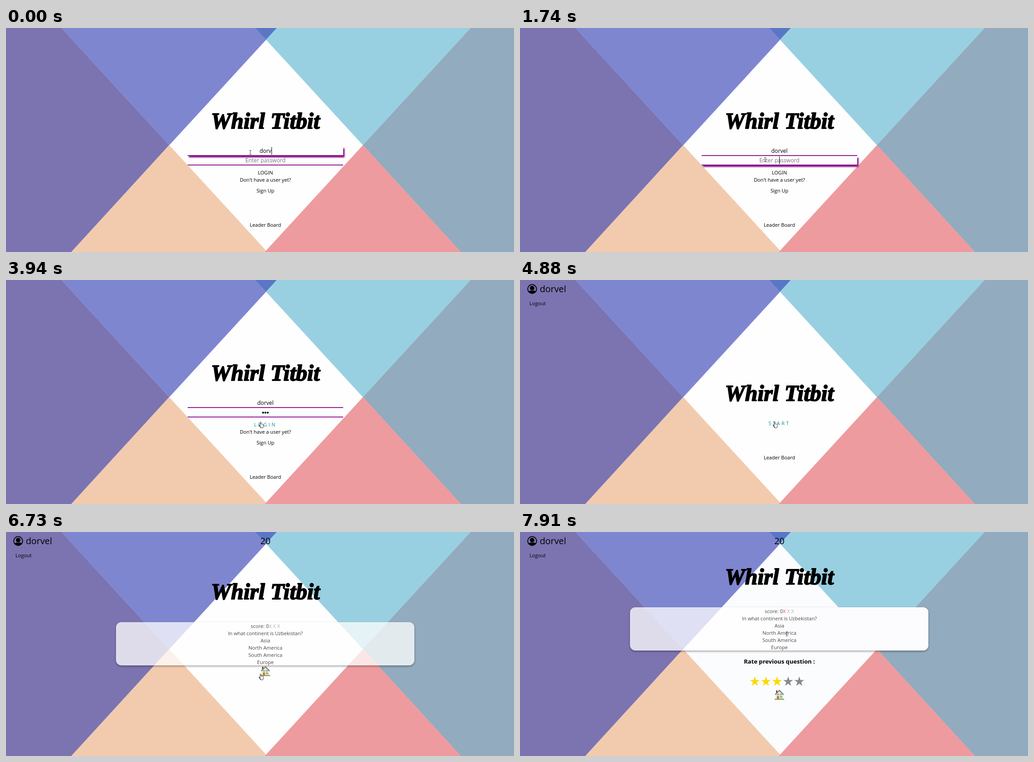
Animation, 1127 px wide and 497 px high, one loop 8000 ms. Source, as an HTML page:

```html
<!DOCTYPE html>
<html lang="en">
<head>
<meta charset="utf-8">
<title>Quiz</title>
<style>
  html, body { margin: 0; width: 100%; height: 100%; overflow: hidden; background: #fff; }
  #stage { position: relative; width: 1127px; height: 497px; overflow: hidden; }
  svg, .field, #bar { position: absolute; left: 0; top: 0; box-sizing: border-box; }
  .field { left: 403px; width: 345px; height: 20px; border-bottom: 2px solid #901a92; }
  #bar {
    left: 244px; width: 662px; overflow: hidden; opacity: .75;
    background: #fff; box-shadow: 0 2px 4px rgba(0, 0, 0, .5);
  }
  text { font: 11.1px "Open Sans", "Noto Sans", sans-serif; text-anchor: middle; white-space: pre; }
  .input { font-size: 12.3px; }
  .big { font-size: 19.8px; }
  .left { text-anchor: start; }
  .hint { fill: #757575; }
  .soft { fill: #000; fill-opacity: .72; }
  .rate { font-size: 13.1px; font-weight: 700; }
  .title {
    font: italic 700 50px "Liberation Serif", "Noto Serif", serif;
    stroke: #000; stroke-width: 2px; stroke-linejoin: round;
  }
</style>
</head>
<body>
<div id="stage">
  <svg id="back" width="1127" height="497"></svg>
  <div class="field" id="user" style="top:264px"></div>
  <div class="field" id="pass" style="top:284.5px"></div>
  <div id="bar"></div>
  <svg id="top" width="1127" height="497"></svg>
</div>
<script>
const LOOP = 8000, MID = 575.5, USER = 'dorvel', TITLE = 'Whirl Titbit';
const MENU = 4090, GAME = 6430, NEXT = 7760;
const CLICK_PASS = 1460, CLICK_LOGIN = 3530;

// Moments at which the screen refreshes
const TICKS = [
  0, 150, 460, 1030, 1170, 1320, 1460, 1600, 1740, 1890, 2040, 2190, 2380, 2570,
  3130, 3250, 3390, 3530, 3670, 3810, 3940, 4090, 4210, 4340, 4480, 4610, 4750, 4880,
  6430, 6580, 6730, 6870, 7010, 7150, 7310, 7460, 7610, 7760, 7910
];

// Pointer path: time, x, y
const PATH = [
  [1030, 542, 276], [1460, 543, 290], [1740, 544, 292], [3130, 544, 292],
  [3530, 564, 318], [3670, 566, 321], [6730, 566, 321], [7150, 594, 230], [7460, 592, 226]
];

const $ = id => document.getElementById(id);
const clamp = v => Math.max(0, Math.min(1, v));
const mix = (a, b, k) => a + (b - a) * k;
const smooth = k => k * k * (3 - 2 * k);
const ramp = (t, from, span) => smooth(clamp((t - from) / span));

const text = (str, y, cls = '', x = MID, extra = '') =>
  `<text x="${x}" y="${y}" class="${cls}" ${extra}>${str}</text>`;
const shape = (d, fill, extra = '') => `<path d="${d}" fill="${fill}" ${extra}/>`;
const at = (x, y, body) => `<g transform="translate(${x} ${y})">${body}</g>`;
const title = y => text(TITLE, y + 18, 'title');

function drawBack(paper) {
  const polys = [
    [paper, '577,26 792,260 577,494 362,260'],
    ['#7b74b1', '0,0 123,0 362,260 145,497 0,497'],
    ['#7f86d0', '123,0 553,0 577,26 362,260'],
    ['#5977c6', '553,0 601,0 577,26'],
    ['#99d0e1', '601,0 1031,0 792,260 577,26'],
    ['#92abbe', '1031,0 1127,0 1127,497 1009,497 792,260'],
    ['#ed9b9e', '792,260 1009,497 580,497 577,494'],
    ['#f2cbae', '362,260 577,494 574,497 145,497'],
    ['#e7a090', '577,494 580,497 574,497']
  ];
  $('back').innerHTML = polys.map(([fill, pts]) =>
    `<polygon points="${pts}" fill="${fill}" stroke="${fill}" stroke-width=".4"/>`).join('');
}

const avatar = at(27, 20,
  '<circle r="9.8" fill="none" stroke="#000" stroke-width="1.8"/><circle cy="-2" r="5" />' +
  shape('M-8 6Q-6 3.5-2.5 3Q0 5 2.5 3Q6 3.5 8 6Q5 10 0 10Q-5 10-8 6Z', '#000'));

const house = y => at(575.5, y,
  shape('M-7.5-9.5h3v7h-3z', '#b8243c') +
  shape('M-8 9.5V-1L1-9L8-1V9.5Z', '#fbe3b4') +
  shape('M-9.5 0L0-9.5L9.5 0', 'none', 'stroke="#6f8790" stroke-width="2.4"') +
  shape('M-5 3h3.5v6.5h-3.5z', '#c9513c') +
  shape('M1 3h5v4h-5zM-5-2h3.5v3h-3.5zM1-2h5v3h-5z', '#4fa9d3') +
  shape('M3-2h1v9h-1z', '#fbe3b4') +
  shape('M-10.5 9h21v2h-21z', '#6a9c3c'));

const POINTERS = {
  beam: shape('M-2.5-4.5h2l.5.5l.5-.5h2M0-4V4M-2.5 4.5h2l.5-.5l.5.5h2', 'none', 'stroke="#444" stroke-width="1"'),
  arrow: shape('M-1-6V4.5L1.5 2.3L3.2 6L4.8 5.3L3.1 1.7H6.3Z', '#fff', 'stroke="#222" stroke-width=".9"'),
  hand: shape('M-2.2 2V-5.5Q-1.2-7.2-.2-5.5V-1.5Q1-2.5 1.8-1.2Q3-2 3.6-.6Q5-1 5 .8V3.5Q4.5 5 3.8 7H-1.2Q-2-.0-5 1.8Q-4.6.2-2.2 2Q-4 .2-5 1.4L-1.2 7',
    '#fff', 'stroke="#222" stroke-width=".9" stroke-linejoin="round"')
};

function pointer(t) {
  let i = PATH.findIndex(p => p[0] > t);
  if (i < 0) i = PATH.length;
  const a = PATH[Math.max(0, i - 1)], b = PATH[Math.min(i, PATH.length - 1)];
  const k = b[0] > a[0] ? clamp((t - a[0]) / (b[0] - a[0])) : 0;
  const kind = t < 3390 ? 'beam' : t < GAME ? 'hand' : t < 6730 ? 'arrow'
    : t < 6870 ? 'hand' : t < 7010 ? 'arrow' : 'beam';
  return at(mix(a[1], b[1], k), mix(a[2], b[2], k), POINTERS[kind]);
}

// Link whose letters spread and turn teal under the pointer
function hoverLink(label, y, k) {
  const c = [[0, 22], [0, 138], [0, 155]].map(([a, b]) => Math.round(mix(a, b, k)));
  return text(label, y, '', MID, `style="letter-spacing:${(3.4 * k).toFixed(2)}px;fill:rgb(${c})"`);
}

const glow = k => `3px 3px 3px rgba(128, 0, 128, ${k})`;

function login(t) {
  const name = USER.slice(0, t < 150 ? 4 : t < 460 ? 5 : 6);
  const dots = t < 2190 ? 0 : t < 2380 ? 1 : t < 2570 ? 2 : 3;
  $('user').style.boxShadow = glow(1 - ramp(t, CLICK_PASS, 300));
  $('pass').style.boxShadow = glow(ramp(t, CLICK_PASS, 300) * (1 - ramp(t, CLICK_LOGIN, 300)));
  let out = title(205) + text(name, 277, 'input', MID, 'id="name"');
  if (!dots) out += text('Enter password', 298, 'input hint');
  for (let i = 0; i < dots; i++)
    out += `<circle cx="${MID + (i - (dots - 1) / 2) * 5.2}" cy="294.3" r="2.1"/>`;
  if (t >= CLICK_PASS && t < 2040 || t >= 2190 && t < 3130)
    out += `<rect x="${Math.round(MID + dots * 2.7 - .5)}" y="285" width="1" height="17"/>`;
  return out + hoverLink('LOGIN', 324.5, ramp(t, 3390, 500)) +
    text('Don\'t have a user yet?', 341) + text('Sign Up', 365) + text('Leader Board', 441);
}

const account = avatar + text(USER, 27, 'big left', 44) + text('Logout', 56, 'left', 21);

const menu = t => account + title(250) + hoverLink('START', 322, ramp(t, 4090, 790)) + text('Leader Board', 398);

function star(x, y, fill) {
  const pts = Array.from({ length: 10 }, (_, i) => {
    const r = i % 2 ? 4.4 : 11.5, a = i * Math.PI / 5;
    return `${x + r * Math.sin(a)},${y - r * Math.cos(a)}`;
  });
  return `<polygon points="${pts.join(' ')}" fill="${fill}"/>`;
}

function game(t) {
  const rest = 1 - clamp((t - GAME) / 680), next = t >= NEXT;
  const y = Math.round(99 + 102 * rest * rest) - (next ? 1 : 0);
  const asked = t >= 6580, top = y + 69, height = asked ? 96 : 16;
  Object.assign($('bar').style, {
    top: top + 'px', height: height + 'px', borderRadius: (asked ? 12 : 8) + 'px'
  });
  const clock = t < 7150 || next ? '20' : t < 7610 ? '19.5' : '19';
  let out = account + text(clock, 27, 'big') + title(y);
  if (next) out += shape(`M576 ${top}H894a12 12 0 0 1 12 12v72a12 12 0 0 1-12 12H576z`, '#fcfcfe');
  const cross = fill => `<tspan fill="${fill}">X</tspan>`;
  out += text('score: 0' + [next ? '#f00000' : '#999', '#999', '#999'].map(cross).join(' '), top + 13, 'soft');
  if (asked)
    ['In what continent is Uzbekistan?', 'Asia', 'North America', 'South America', 'Europe']
      .forEach((row, i) => out += text(row, top + 29 + 16 * i, 'soft'));
  if (next) {
    out += text('Rate previous question :', 292, 'rate');
    for (let i = 0; i < 5; i++) out += star(521 + 24.65 * i, 332, i < 3 ? '#ffd700' : '#888');
  }
  return out + house(next ? 361 : top + height + 12.5);
}

function render(t) {
  const onLogin = t < MENU, onGame = t >= GAME;
  drawBack(t >= NEXT ? '#fbfcfe' : '#fefefe');
  $('user').hidden = $('pass').hidden = !onLogin;
  $('bar').hidden = !onGame;
  $('top').innerHTML = (onLogin ? login(t) : onGame ? game(t) : menu(t)) + pointer(t);
  if (t < 1030) {
    const x = Math.round(MID + $('name').getComputedTextLength() / 2);
    $('top').insertAdjacentHTML('beforeend', `<rect x="${x}" y="264" width="1" height="17"/>`);
  }
}

const start = performance.now();
let shown = -1;
function frame() {
  const t = (performance.now() - start) % LOOP;
  const tick = TICKS.filter(v => v <= t).pop();
  if (tick !== shown) render(shown = tick);
  requestAnimationFrame(frame);
}
frame();
</script>
</body>
</html>
```
